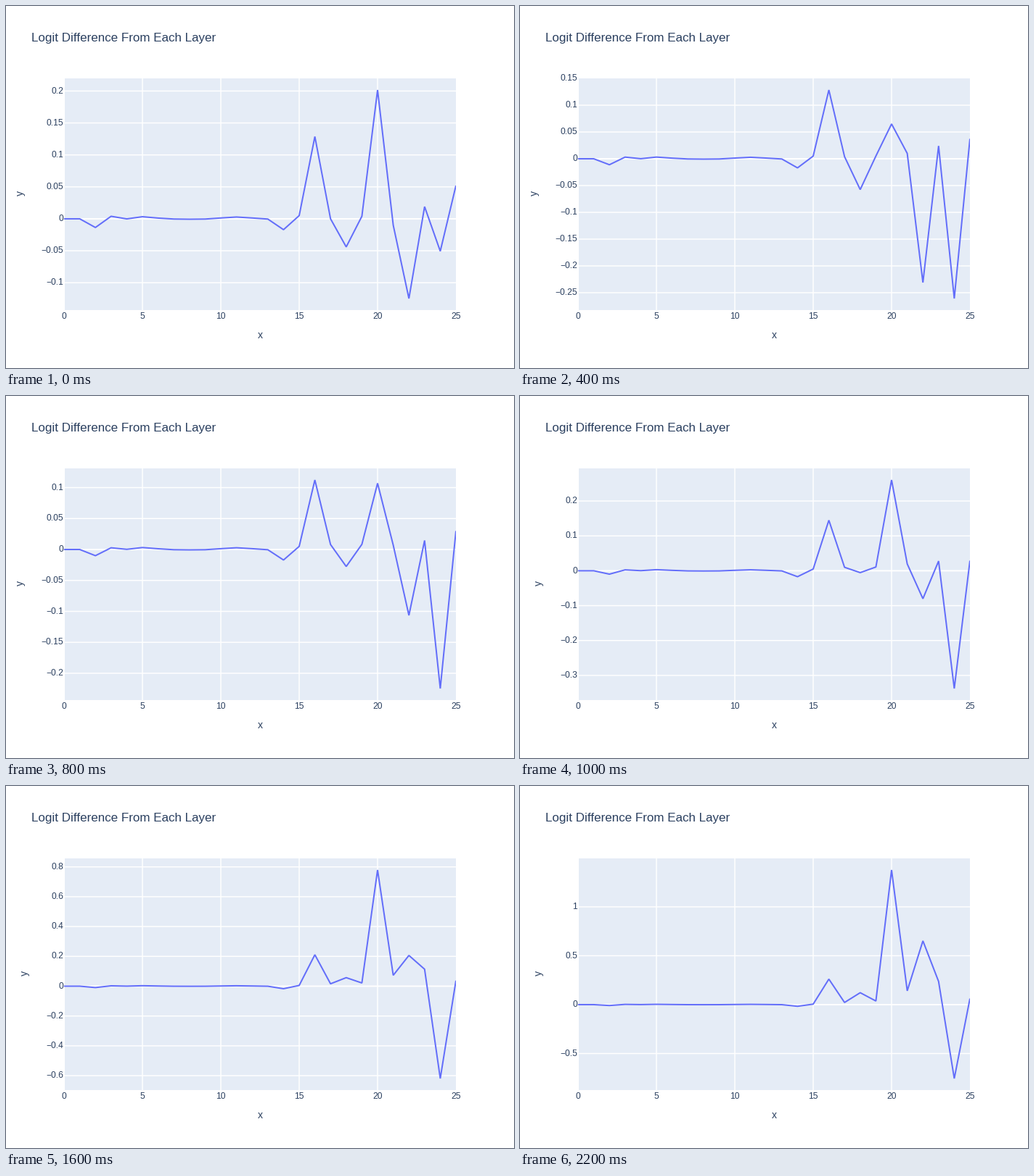
A matplotlib script that plays this animation: 700 px wide and 500 px high, repeating every 2.3 s.

```python
import math

import matplotlib.pyplot as plt
import numpy as np
from matplotlib.animation import FuncAnimation
from matplotlib.patches import Rectangle

W, H, DPI = 700, 500, 100
FRAMES, INTERVAL = 23, 100
LEFT, RIGHT, TOP, BOTTOM = 80, 620, 100, 420
PAD = (BOTTOM - TOP) / 20
INK, PLOT_BG, TRACE = "#2a3f5f", "#e5ecf6", "#636efa"

plt.rcParams["font.family"] = "Liberation Sans"
plt.rcParams["text.hinting"] = "force_autohint"

# Key points of the lively layers; all others follow formulas.
KEY_TIMES = (0, 4, 8, 12, 22)
PEAKS = {
    16: (.1287, .1284, .1123, .182, .261),
    18: (-.044, -.0575, -.0275, .02, .122),
    20: (.2016, .065, .107, .4356, 1.377),
    21: (-.01, .01, .007, .034, .141),
    22: (-.1247, -.231, -.1064, -.05, .652),
    23: (.019, .024, .0146, .043, .237),
    24: (-.0507, -.2608, -.2246, -.3843, -.7555),
}


def peak_at(t, keys):
    i = max(k for k in range(len(keys) - 1) if KEY_TIMES[k] <= t)
    a, b = keys[i:i + 2]
    u = (t - KEY_TIMES[i]) / (KEY_TIMES[i + 1] - KEY_TIMES[i])
    sinking = b < a < 0
    return a + (b - a) * u ** (0.5 if sinking else 1.1)


def values_at(t):
    vals = np.zeros(26)
    # Quiet start: a dip at layer 2 that rings out over a small ripple.
    n = np.arange(2, 14)
    dip = -.0085 - .0045 * math.exp(-t / 5)
    vals[2:14] = (dip * (-1 / 3.0) ** (n - 2) - .0006
                  + .0034 * np.cos(math.pi * (n - 5) / 6) ** 4)
    vals[14] = -.017
    vals[15] = .005
    vals[17] = .001 * t
    vals[19] = .004 + .033 * (t / 22) ** 2
    vals[25] = .029 + .023 * (t / 10 - 1) ** 2
    for layer, keys in PEAKS.items():
        vals[layer] = peak_at(t, keys)
    return vals


def tick_step(span):
    rough = span / 9
    base = 10 ** math.floor(math.log10(rough))
    return next(m for m in (2, 5, 10) if rough <= m * base) * base


def px(width):
    return width * 72 / DPI


fig = plt.figure(figsize=(W / DPI, H / DPI), dpi=DPI, facecolor="white")
ax = fig.add_axes([0, 0, 1, 1])


def label(x, y, text, size, ha="center", **kw):
    # Agg sets text one pixel below the given baseline.
    ax.text(x, y - 1, text, fontsize=px(size), color=INK, ha=ha,
            va="baseline", **kw)


def stroke(xs, ys, color, width, z, clip):
    line, = ax.plot(xs, ys, color=color, lw=px(width), zorder=z, snap=False,
                    solid_capstyle="butt", solid_joinstyle="bevel")
    line.set_clip_path(clip)


def draw(frame):
    ax.clear()
    ax.set_xlim(0, W)
    ax.set_ylim(H, 0)
    ax.axis("off")
    area = Rectangle((LEFT, TOP), RIGHT - LEFT, BOTTOM - TOP,
                     fc=PLOT_BG, lw=0, zorder=0)
    ax.add_patch(area)

    vals = values_at(frame)
    low, high = vals.min(), vals.max()
    scale = (BOTTOM - TOP - 2 * PAD) / (high - low)

    def to_y(v):
        return TOP + PAD + (high - v) * scale

    for n in range(0, 26, 5):
        x = LEFT + (RIGHT - LEFT) * n / 25
        if n < 25:
            stroke([x, x], [TOP, BOTTOM], "white", 1.5 if n else 2, 1, area)
        label(x, 433, str(n), 12)

    step = tick_step((BOTTOM - TOP) / scale)
    widest = 0
    for k in range(-12, 13):
        y = to_y(k * step)
        if not TOP <= y <= BOTTOM:
            continue
        if TOP + 1 < y < BOTTOM - 1:
            stroke([LEFT, RIGHT], [y, y], "white", 1.5 if k else 2, 1, area)
        text = f"{round(k * step, 4):g}".replace("-", "\u2212")
        widest = max(widest, len(text))
        label(LEFT - 1, y + 4.2, text, 12, ha="right")

    xs = np.linspace(LEFT, RIGHT, len(vals))
    stroke(xs, to_y(vals), TRACE, 2, 3, area)

    label(35, 50, "Logit Difference From Each Layer", 17, ha="left")
    label(350, 460, "x", 14)
    label(23.7 if widest > 4 else 30.4, 260, "y", 14,
          rotation=90, rotation_mode="anchor")
    return []


anim = FuncAnimation(fig, draw, frames=FRAMES, interval=INTERVAL,
                     init_func=lambda: draw(0), repeat=True, repeat_delay=0)
plt.show()
```
